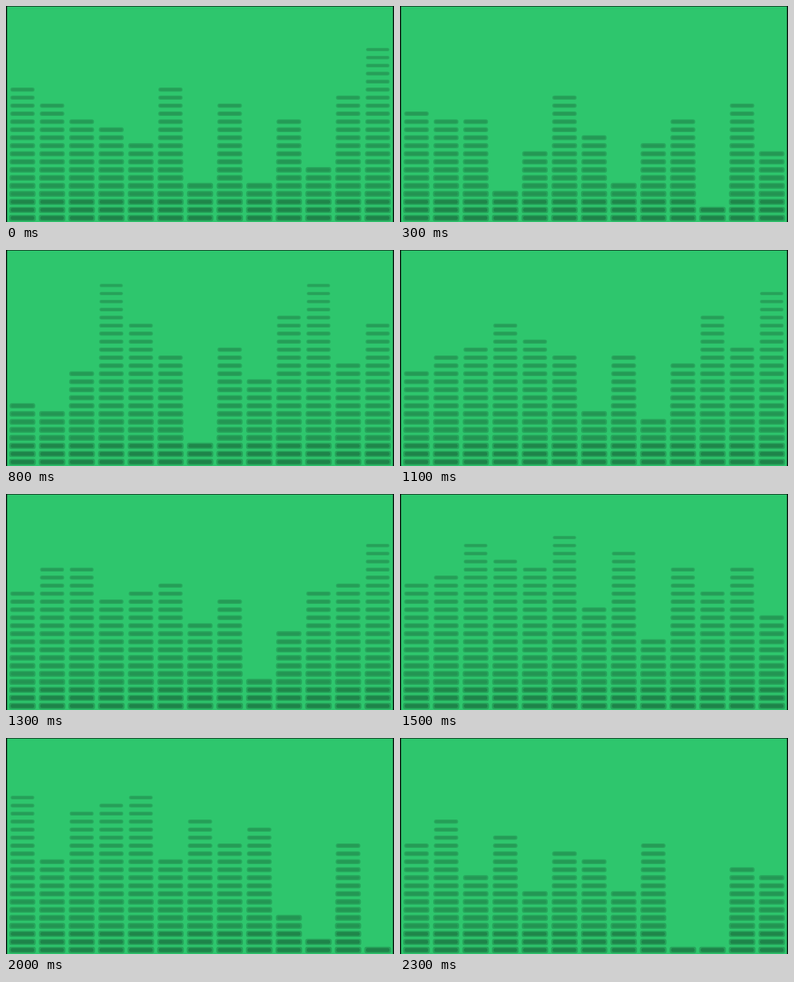
An HTML page with a canvas for the animation above (2400 ms loop, 596 by 334 pixels).

```html
<!DOCTYPE html>
<html lang="en">
<head>
<meta charset="utf-8">
<title>Equalizer</title>
<style>
  html, body { margin: 0; width: 100%; height: 100%; overflow: hidden; background: #2ec66d; }
  canvas { display: block; width: 596px; height: 334px; }
</style>
</head>
<body>
<canvas id="stage" width="596" height="334"></canvas>
<script>
const ctx = document.getElementById('stage').getContext('2d');
const STEP = 100, STEPS = 24, ROWS = 26;

// Lit rows per column at key steps of the loop
const keys = [
  [0,  [17, 15, 13, 12, 10, 17, 5, 15, 5, 13, 7, 16, 22]],
  [5,  [11, 11, 13, 3, 10, 15, 14, 1, 13, 13, 2, 14, 2]],
  [8,  [8, 7, 12, 23, 18, 14, 3, 15, 11, 19, 23, 13, 18]],
  [13, [15, 18, 18, 14, 15, 16, 11, 14, 4, 10, 15, 16, 21]],
  [17, [17, 15, 22, 24, 22, 26, 14, 24, 16, 25, 14, 19, 2]],
  [20, [20, 12, 18, 19, 20, 12, 17, 14, 16, 5, 2, 14, 1]],
  [23, [14, 17, 10, 15, 8, 13, 12, 8, 14, 1, 1, 11, 10]]
];

const mix = (a, b, p) => a + (b - a) * p;
const mixColor = (a, b, p) => `rgb(${a.map((v, i) => Math.round(mix(v, b[i], p))).join()})`;

// Key by index, wrapping around the loop
function keyAt(i) {
  const n = keys.length, lap = Math.floor(i / n);
  const [at, levels] = keys[i - lap * n];
  return { at: at + lap * STEPS, levels };
}

function peak(step) {
  return step < 7 ? 24 : step < 13 ? 25 : step < 19 ? 26 : 22;
}

// Smooth curve through the keys, rounded to whole rows
function level(col, step) {
  let i = keys.length - 1;
  while (keys[i][0] > step) i--;
  const [k0, k1, k2, k3] = [i - 1, i, i + 1, i + 2].map(keyAt);
  const slope = (a, b) => (b.levels[col] - a.levels[col]) / (b.at - a.at);
  const span = k2.at - k1.at, u = (step - k1.at) / span;
  const m1 = slope(k0, k2) * span, m2 = slope(k1, k3) * span;
  const a = k1.levels[col], b = k2.levels[col];
  const v = a + m1 * u + (3 * (b - a) - 2 * m1 - m2) * u * u
    + (2 * (a - b) + m1 + m2) * u * u * u;
  return Math.max(1, Math.min(peak(step), Math.round(v)));
}

function pill(x, y, w, h, r, color) {
  ctx.fillStyle = color;
  ctx.beginPath();
  ctx.roundRect(x - w / 2, y - h / 2, w, h, Math.min(r, h / 2));
  ctx.fill();
}

function segment(col, row) {
  const p = row / (ROWS - 1);
  const x = 25.3 + col * 45.47, y = 327.7 - row * 12.4;
  const w = mix(41, 35, p), h = mix(10, 4.4, p);
  const base = row < 3 ? [30, 131, 73] : [34, 146, 81];
  pill(x, y, w, h, 3.5, mixColor([38, 163, 90], [41, 176, 97], p));
  pill(x, y, w - mix(5, 2, p), h - mix(4, 1.4, p), 2.5, mixColor(base, [39, 164, 91], p));
}

function draw() {
  const step = Math.floor(performance.now() / STEP) % STEPS;
  ctx.fillStyle = '#2ec66d';
  ctx.fillRect(0, 0, 596, 334);
  for (let col = 0; col < 13; col++) {
    const lit = level(col, step);
    for (let row = 0; row < lit; row++) segment(col, row);
  }
  ctx.fillStyle = '#0b2f1a';
  ctx.fillRect(0, 0, 596, 1);
  ctx.fillStyle = '#000';
  ctx.fillRect(0, 0, 1.5, 334);
  ctx.fillRect(594.5, 0, 1.5, 334);
  requestAnimationFrame(draw);
}
draw();
</script>
</body>
</html>
```
